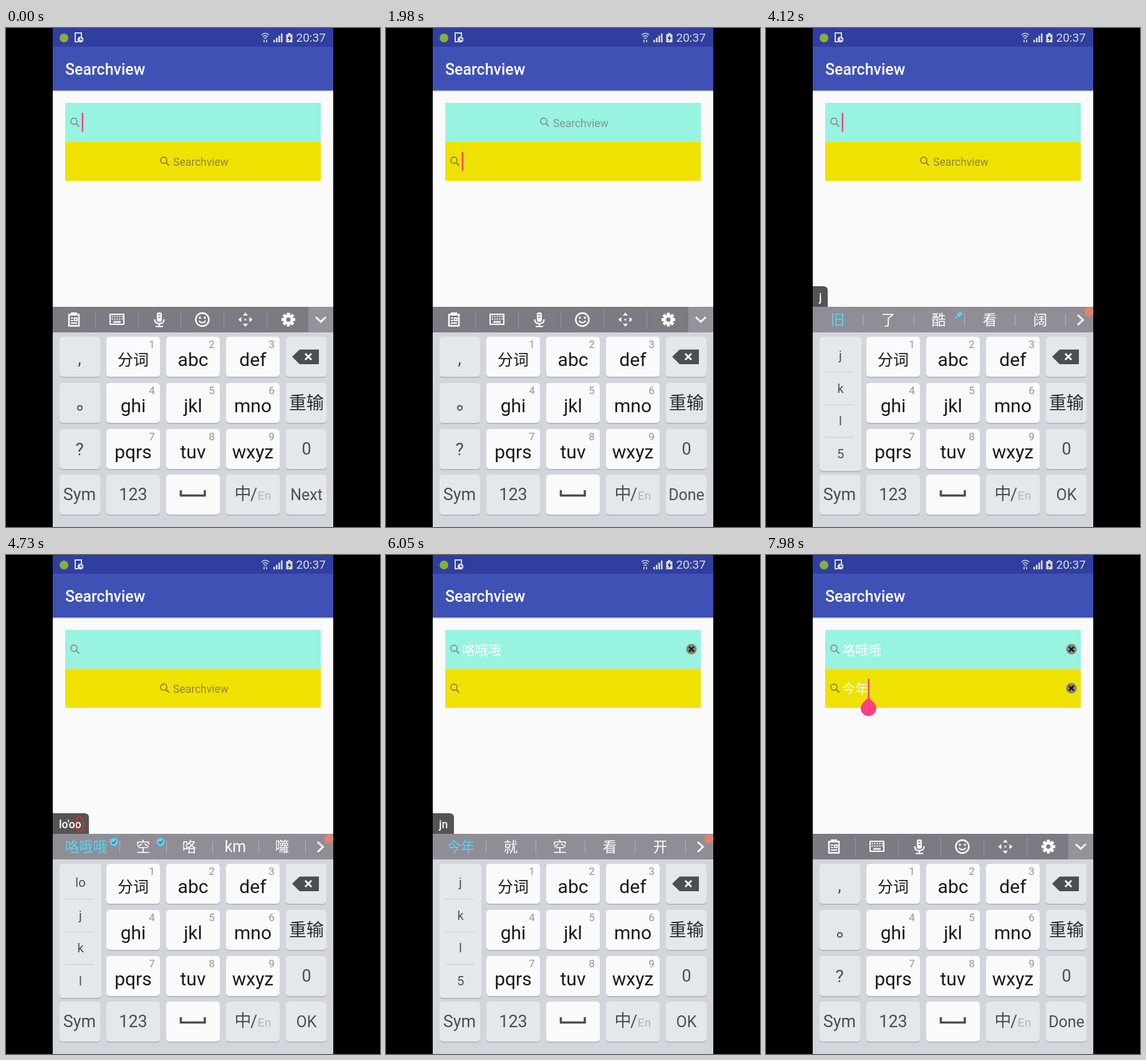
Write an HTML page that moves like this. It is 600x800 px and loops after 8 s.

```html
<!DOCTYPE html>
<html lang="en">
<head>
<meta charset="utf-8">
<title>Searchview</title>
<style>
html, body { margin: 0; width: 100%; height: 100%; overflow: hidden; background: #000; }
svg { display: block; width: 600px; height: 800px; }
text { font-family: Roboto, "Noto Sans CJK SC", "Noto Sans CJK", sans-serif; }
.line { fill: none; stroke: #fff; stroke-width: 2.4; }
.mid { text-anchor: middle; }
</style>
</head>
<body>
<svg id="stage" viewBox="0 0 600 800"></svg>
<script>
const LOOP = 8000, SLIDE = 260;
const WHITE = '#fff', INK = '#1a1a1a', SOFT = '#4b4f53', CYAN = '#5cd3ee', ACCENT = '#ff4081';
const KEY = '#e5e8eb', LIGHT = '#fafafa', BAR = '#918d96', TOOLS = '#7e7a84', DARK = '#545356';

const rect = (x, y, w, h, fill, r = 0) =>
  `<rect x="${x}" y="${y}" width="${w}" height="${h}" rx="${r}" fill="${fill}"/>`;
const circle = (x, y, r, fill) => `<circle cx="${x}" cy="${y}" r="${r}" fill="${fill}"/>`;
const stroke = (color, width) => `fill="none" stroke="${color}" stroke-width="${width}"`;
const ring = (x, y, r, color, width) => `<circle cx="${x}" cy="${y}" r="${r}" ${stroke(color, width)}/>`;
const path = (d, attrs = 'class="line"') => `<path d="${d}" ${attrs}/>`;
const text = (s, x, y, size, fill, attrs = '') =>
  `<text x="${x}" y="${y}" font-size="${size}" fill="${fill}" ${attrs}>${s}</text>`;
const label = (s, x, y, size, fill) => text(s, x, y, size, fill, 'class="mid"');

const COLS = [[86, 65], [161, 86], [257, 86], [353, 86], [449, 65]];
const ROWS = [495, 569, 643, 716];

const keyBox = (x, y, w, h, fill) => rect(x, y + 2, w, h, '#b6babf', 5) + rect(x, y, w, h, fill, 5);
const keyAt = (c, r, fill = KEY) => keyBox(COLS[c][0], ROWS[r], COLS[c][1], 64, fill);

function screen() {
  return rect(0, 0, 600, 800, '#000') + rect(75, 0, 450, 800, '#fafafa') +
    rect(75, 0, 450, 30, '#303f9f') + rect(75, 100, 450, 1.5, '#b4b4b4') +
    rect(75, 30, 450, 70, '#3f51b5') +
    text('Searchview', 95, 75, 25, WHITE, 'font-weight="500"') +
    statusIcons() + text('20:37', 465.5, 22, 19, '#dcdcdc');
}

function statusIcons() {
  const c = '#dcdcdc';
  const bars = [0, 1, 2, 3].map(i => rect(429 + i * 4, 19 - i * 3.4, 2.6, 4 + i * 3.4, c)).join('');
  return circle(93, 16, 7, '#8aae3a') +
    path('M116 22h-5V8h10v6', stroke(c, 2)) + circle(119.5, 18.5, 4.8, c) +
    path('M119.5 15.5v3h3', stroke('#303f9f', 1.3)) +
    path('M410 11q6-5 12 0M412 14q4-3.5 8 0M414 17q2-2 4 0M414 19v4M418 19v4', stroke(c, 1.6)) +
    bars + rect(452.5, 8, 4, 3, c) + rect(449.5, 10, 10, 13, c, 1) +
    path('M456 11l-4.5 6h3l-1.5 5 5-6.5h-3z', 'fill="#20284c"');
}

function keyboard() {
  const words = ['分词', 'abc', 'def', 'ghi', 'jkl', 'mno', 'pqrs', 'tuv', 'wxyz'];
  let s = rect(75, 488, 450, 312, '#d2d6dc');
  words.forEach((word, i) => {
    const c = 1 + i % 3, r = Math.floor(i / 3), [x, w] = COLS[c], y = ROWS[r];
    s += keyAt(c, r, LIGHT) + label(word, x + w / 2, y + 47 - (i ? 0 : 1), i ? 30 : 25, INK) +
      label(i + 1, x + 73, y + 18, 17, '#949494');
  });
  for (let r = 0; r < 4; r++) s += keyAt(4, r);
  s += keyAt(0, 3) + keyAt(1, 3) + keyAt(2, 3, LIGHT) + keyAt(3, 3);
  return s + path('M459 527l12-11.5h31v23.5h-31z', `fill="${SOFT}"`) +
    path('M480 522l10 10m0-10l-10 10', stroke('#f4f6f8', 3)) +
    label('重输', 482, 611, 28, '#2a2c2e') + label('0', 482, 684, 27, SOFT) +
    label('Sym', 118, 757, 27, SOFT) + label('123', 204, 757, 27, SOFT) +
    path('M280.5 741v8.5h38.5v-8.5', stroke(SOFT, 3.5)) +
    label('中', 380, 756, 27, SOFT) + label('/', 397.5, 757, 27, SOFT) +
    label('En', 414.5, 756, 19, '#b0b4b8');
}

function punctuation() {
  return [0, 1, 2].map(r => keyAt(0, r)).join('') + label(',', 118, 539, 28, SOFT) +
    ring(118.5, 609, 3.6, SOFT, 2) + label('?', 118, 685, 28, SOFT);
}

function syllables(list) {
  return keyBox(86, 495, 67, 215, KEY) + list.map((s, i) =>
    label(s, 119.5, 532 + i * 52.5, 20, SOFT) +
    (i ? rect(94, 499 + i * 52.3, 47, 1, '#c6cace') : '')).join('');
}

const gear = Array.from({ length: 8 }, (_, i) =>
  path('M450.5 456.5h5v6h-5z', `fill="${WHITE}" transform="rotate(${i * 45} 453 467.5)"`)).join('');
const dots = [0, 1, 2].map(r => [0, 1, 2, 3, 4].map(c =>
  r === 2 && (c === 0 || c === 4) ? '' : rect(169.5 + c * 4, 461.5 + r * 4, 2, 2, WHITE)).join('')).join('');
const arrows = [0, 90, 180, 270].map(a =>
  path('M384 456l4 5h-8z', `fill="${WHITE}" transform="rotate(${a} 384 467.5)"`)).join('');

function toolbar() {
  const seps = [143, 212, 280, 349, 418].map(x => rect(x, 453, 1.2, 30, '#96929a')).join('');
  return rect(75, 447, 450, 41, TOOLS) + rect(485, 447, 40, 41, '#96929a') + seps +
    path('M101 459.5h16v18h-16z') + rect(104, 456, 10, 5, WHITE) +
    path('M104 465h4m-4 4h4m-4 4h10m-4-8h4v4h-4z', stroke(WHITE, 1.8)) +
    path('M167 459h22v16h-22z', stroke(WHITE, 2)) + dots + rect(172, 470.5, 12, 2, WHITE) +
    rect(242, 456, 8, 15, WHITE, 3) + path('M244 460h4m-4 4h4', stroke(TOOLS, 1.3)) +
    path('M238.5 467q0 7 7.5 7t7.5-7M246 474v4M240 478.5h12', stroke(WHITE, 2.2)) +
    ring(315, 467.5, 10.5, WHITE, 2.4) + circle(311, 464.5, 1.7, WHITE) + circle(319, 464.5, 1.7, WHITE) +
    path('M309.5 469.5q5.5 6 11 0', stroke(WHITE, 2)) +
    arrows + circle(384, 467.5, 1.6, WHITE) +
    gear + ring(453, 467.5, 5.8, WHITE, 4.5) +
    path('M497 463.5l8 7.5 8-7.5', stroke(WHITE, 2.8));
}

// Candidate bars: [word, centre] pairs, separators, badges.
const BARS = {
  three: {
    words: [['咯哦哦', 128.5], ['空', 220], ['咯', 294], ['km', 368], ['囖', 443]],
    seps: [182, 257, 331, 405, 480], ticks: [173, 248]
  },
  one: {
    words: [['旧', 115], ['了', 196], ['酷', 277], ['看', 359], ['阔', 440]],
    seps: [155, 237, 318, 399, 480], pen: true
  },
  year: {
    words: [['今年', 120], ['就', 200], ['空', 279], ['看', 359], ['开', 440]],
    seps: [160, 240, 319, 399, 480]
  },
  next: {
    words: [['的', 114], ['我', 192], ['过年', 277], ['就', 361], ['是', 440]],
    seps: [153, 232, 322, 401, 480]
  }
};

function candidates({ words, seps, ticks = [], pen }) {
  return rect(75, 447, 450, 41, BAR) +
    seps.map(x => rect(x, 458, 1, 20, '#b6b2ba')).join('') +
    words.map(([w, x], i) => label(w, x, 476, w === 'km' ? 25 : 22.5, i ? WHITE : CYAN)).join('') +
    ticks.map(x => circle(x, 460, 6.5, CYAN) + path(`M${x - 3} 460l2.5 2.5 4-4.5`, stroke(DARK, 1.5))).join('') +
    (pen ? path('M303 466l1.5-5 7-7 4 4-7 7z', `fill="${CYAN}"`) + path('M305 461l4 4', stroke(DARK, 1)) : '') +
    path('M500 460l8.5 8-8.5 8', stroke(WHITE, 3)) + circle(518, 455, 7.5, '#e0836c');
}

function composing(s) {
  const w = { j: 24, lo: 34, jn: 34 }[s] || 58;
  return path(`M75 447v-33h${w - 7}q7 0 7 7v26z`, `fill="${DARK}"`) +
    text(s, 85, 438, 17.5, WHITE, 'font-weight="500"') +
    (w === 58 ? `<ellipse cx="118" cy="432" rx="7" ry="12" ${stroke('#e0301c', 2)}/>` : '');
}

// Keyboard states: start, candidate bar, typed letters, action key.
const STATES = [
  [0, '', '', 'Next'], [1700, '', '', 'Done'], [2500, '', '', 'Next'],
  [3960, 'one', 'j', 'OK'], [4270, 'three', 'lo', 'OK'], [4520, 'three', "lo'oo", 'OK'],
  [4830, 'next', '', 'Next'], [5100, '', '', 'Done'],
  [5540, 'one', 'j', 'OK'], [6000, 'year', 'jn', 'OK'],
  [6410, 'next', '', 'Done'], [7250, '', '', 'Done']
];

function input([, bar, typed, action]) {
  const list = typed.startsWith('lo') ? ['lo', 'j', 'k', 'l'] : ['j', 'k', 'l', '5'];
  return (bar ? candidates(BARS[bar]) : toolbar()) +
    (typed ? composing(typed) + syllables(list) : punctuation()) +
    label(action, 482, 757, 25, SOFT);
}

const ease = p => (1 - Math.cos(Math.PI * Math.min(1, Math.max(0, p)))) / 2;
const slide = (t, start) => ease((t - start) / SLIDE);
const within = (t, spans) => spans.some(([a, b]) => t >= a && t < b);

// "centred" runs from 0 (icon at the left) to 1 (icon and hint in the middle).
function field(y, fill, grey, centred, value, cursor) {
  const dx = 144 * centred, end = 122 + value.length * 21;
  return rect(95, y, 410, 62.5, fill) +
    path(`M${113 + dx} ${y + 33.5}l4.5 4.5`, stroke(grey, 2.2)) +
    ring(109 + dx, y + 29.5, 5, grey, 1.8) +
    (centred ? text('Searchview', 124 + dx, y + 38.5, 17.5, grey, `opacity="${centred}"`) : '') +
    (value ? text(value, 122, y + 39.5, 21, WHITE) + circle(490, y + 31, 8.5, '#84847a') +
      path(`M486 ${y + 27}l8 8m0-8l-8 8`, stroke('#0c0c0c', 2.4)) : '') +
    (cursor ? rect(end - .5, y + 16, 2.5, 30.5, ACCENT) : '');
}

function fields(t) {
  const away = slide(t, 1630) - slide(t, 2440);
  const first = t >= 4830 ? '咯哦哦' : '', second = t >= 6410 ? '今年' : '';
  const on1 = within(t, [[0, 250], [760, 1270], [2700, 3200], [3760, 4260]]);
  const on2 = within(t, [[1940, 2440], [5360, 5860], [6410, 6910], [7250, LOOP]]);
  const handle = t >= 7250 ? path('M164.5 228l9.5 9.5a12.5 12.5 0 1 1-19 0z', `fill="${ACCENT}"`) : '';
  return field(120, '#98f3e1', '#7d9692', away, first, on1) +
    field(182.5, '#f0e200', '#8c8638', 1 - away - slide(t, 5100), second, on2) + handle;
}

const stage = document.getElementById('stage');
stage.innerHTML = screen() + '<g id="fields"></g>' + keyboard() + '<g id="input"></g>';
const fieldLayer = document.getElementById('fields'), inputLayer = document.getElementById('input');
let shown;

function draw(now) {
  const t = now % LOOP;
  const state = STATES.findLast(s => s[0] <= t);
  if (state !== shown) inputLayer.innerHTML = input(shown = state);
  fieldLayer.innerHTML = fields(t);
}

const begin = performance.now();
function tick() {
  draw(performance.now() - begin);
  requestAnimationFrame(tick);
}
tick();
</script>
</body>
</html>
```
